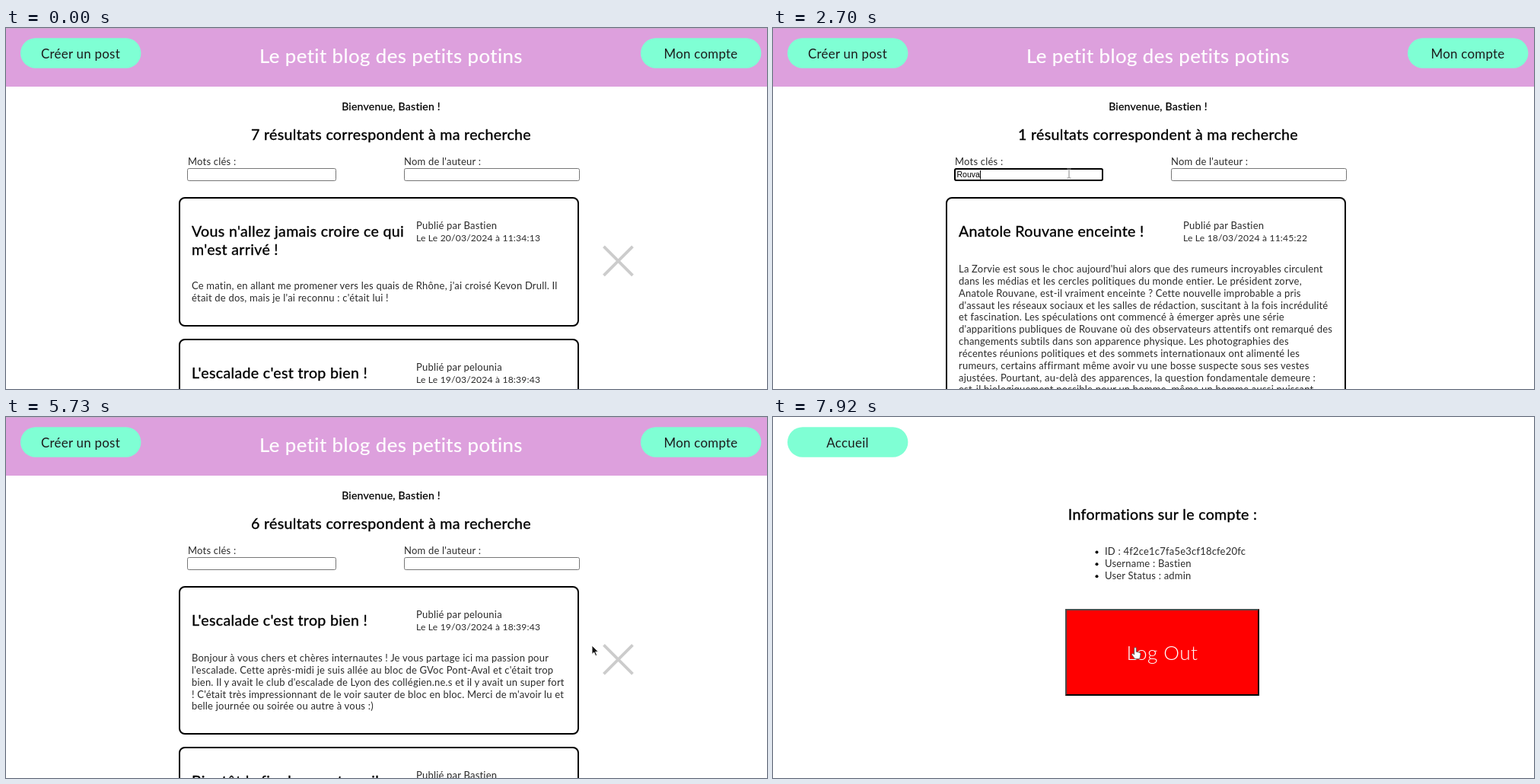
These frames come from a looping animation (1000x474 px, 8 s). An HTML page:

```html
<!DOCTYPE html>
<html lang="fr">
<head>
<meta charset="utf-8">
<title>Le petit blog des petits potins</title>
<style>
  html, body { margin: 0; width: 100%; height: 100%; overflow: hidden; background: #fff; }
  svg { display: block; width: 1000px; height: 474px; }
  text { font: 13px Lato, sans-serif; letter-spacing: .016em; fill: #2b2b2b; }
  .bold { fill: #000; stroke: #000; stroke-width: .018em; stroke-linejoin: round; }
  .h2 { font-size: 19.6px; }
  .h3 { font-size: 14.1px; }
  .mid { text-anchor: middle; }
  .site { font-size: 25.8px; fill: #fff; stroke: #fff; stroke-width: .008em; }
  .btn { font-size: 16.9px; fill: #1c1c1c; }
  .date { font-size: 12.1px; }
  .typed { font: 10.56px "Liberation Sans", sans-serif; letter-spacing: 0; fill: #000; }
  .logout { font-size: 26.2px; font-weight: 300; fill: #fff; }
  .card { fill: #fff; stroke: #000; stroke-width: 2; }
  .field { fill: #fff; stroke: #767676; }
  .cross { fill: none; stroke: #ccc; stroke-width: 3.8; }
  .hot .cross { stroke: #b3b3b3; }
  .arrow { fill: #111; stroke: #fff; stroke-width: .9; }
  .beam { fill: none; stroke: #888; }
  .hand { fill: #fff; stroke: #555; stroke-width: .9; }
</style>
</head>
<body>
<svg id="stage" viewBox="0 0 1000 474"></svg>
<script>
const LOOP = 8000, LINE = 15.84, GAP = 16.3;
const stage = document.getElementById('stage');

function add(parent, tag, attrs = {}, content) {
  const node = document.createElementNS('http://www.w3.org/2000/svg', tag);
  for (const key in attrs) node.setAttribute(key, attrs[key]);
  if (content !== undefined) node.textContent = content;
  return parent.appendChild(node);
}
const group = parent => add(parent, 'g');
const rect = (parent, x, y, width, height, attrs) => add(parent, 'rect', { x, y, width, height, ...attrs });
const text = (parent, x, y, content, cls = '') => add(parent, 'text', { x, y, class: cls }, content);
const show = (node, on) => { node.style.display = on ? '' : 'none'; };

function pill(parent, x, label) {
  rect(parent, x, 13.2, 158.4, 39.6, { rx: 19.8, fill: '#7fffd4' });
  text(parent, x + 79, 39.8, label, 'btn mid');
}

const rumour = {
  title: ['Anatole Rouvane enceinte !'], author: 'Bastien', date: '18/03/2024 à 11:45:22', lines: 30,
  body: [
    "La Zorvie est sous le choc aujourd'hui alors que des rumeurs incroyables circulent",
    'dans les médias et les cercles politiques du monde entier. Le président zorve,',
    'Anatole Rouvane, est-il vraiment enceinte ? Cette nouvelle improbable a pris',
    "d'assaut les réseaux sociaux et les salles de rédaction, suscitant à la fois incrédulité",
    'et fascination. Les spéculations ont commencé à émerger après une série',
    "d'apparitions publiques de Rouvane où des observateurs attentifs ont remarqué des",
    'changements subtils dans son apparence physique. Les photographies des',
    'récentes réunions politiques et des sommets internationaux ont alimenté les',
    'rumeurs, certains affirmant même avoir vu une bosse suspecte sous ses vestes',
    'ajustées. Pourtant, au-delà des apparences, la question fondamentale demeure :',
    'est-il biologiquement possible pour un homme, même un homme aussi puissant'
  ]
};
const star = {
  title: ["Vous n'allez jamais croire ce qui", "m'est arrivé !"], author: 'Bastien', date: '20/03/2024 à 11:34:13',
  body: [
    "Ce matin, en allant me promener vers les quais de Rhône, j'ai croisé Kevon Drull. Il",
    "était de dos, mais je l'ai reconnu : c'était lui !"
  ]
};
const climbing = {
  title: ["L'escalade c'est trop bien !"], author: 'pelounia', date: '19/03/2024 à 18:39:43',
  body: [
    'Bonjour à vous chers et chères internautes ! Je vous partage ici ma passion pour',
    "l'escalade. Cette après-midi je suis allée au bloc de GVoc Pont-Aval et c'était trop",
    "bien. Il y avait le club d'escalade de Lyon des collégien.ne.s et il y avait un super fort",
    "! C'était très impressionnant de le voir sauter de bloc en bloc. Merci de m'avoir lu et",
    'belle journée ou soirée ou autre à vous :)'
  ]
};
const work = { title: ['Bientôt la fin de mon travail'], author: 'Bastien', date: '19/03/2024 à 10:12:08', body: [''] };
const best = { title: ['Le meilleur avant de tout'], author: 'zigou', date: '18/03/2024 à 16:20:31', body: [''] };

function card(parent, post, top) {
  const g = group(parent);
  const bodyTop = 99 + 22 * (post.title.length - 1);
  const height = Math.round(bodyTop + LINE * ((post.lines || post.body.length) - 1) + 33);
  rect(g, 228, top + 1, 524, height - 2, { rx: 7, class: 'card' });
  post.title.forEach((line, i) => text(g, 244, top + 51.5 + 24 * i, line, 'bold h2'));
  text(g, 539, top + 42, 'Publié par ' + post.author);
  text(g, 539, top + 58, 'Le Le ' + post.date, 'date');
  post.body.forEach((line, i) => text(g, 244, top + bodyTop + LINE * i, line));
  const y = top + height / 2 - 1.2;
  add(parent, 'path', { class: 'cross', d: `M785.5 ${y - 19}l38 38m0 -38l-38 38` });
  return { g, height, middle: top + height / 2 };
}

function results(count, posts) {
  const g = group(home);
  text(g, 506, 147, count + ' résultats correspondent à ma recherche', 'bold h2 mid');
  let top = 222;
  const cards = posts.map(post => {
    const made = card(g, post, top);
    top = Math.round(top + made.height + GAP);
    return made;
  });
  return { g, first: cards[0] };
}

// Blog page
const home = group(stage);
rect(home, 0, 0, 1000, 77, { fill: '#dda0dd' });
rect(home, 0, 0, 1000, 1, { fill: '#cbabcb' });
pill(home, 19, 'Créer un post');
pill(home, 834, 'Mon compte');
text(home, 506, 46.3, 'Le petit blog des petits potins', 'bold site mid');
text(home, 506, 107.8, 'Bienvenue, Bastien !', 'bold h3 mid');
text(home, 239, 180.3, 'Mots clés :');
text(home, 523, 180.3, "Nom de l'auteur :");
rect(home, 238.5, 184.5, 195, 16, { rx: 2, class: 'field' });
rect(home, 523.5, 184.5, 230, 16, { rx: 2, class: 'field' });
const focusRing = rect(home, 239, 185, 194, 15, { rx: 2, fill: '#fff', stroke: '#000', 'stroke-width': 2 });
const typed = text(home, 241.5, 196.3, '', 'typed');
const caret = rect(home, 242, 187, 1, 11.5, { fill: '#000' });
const lists = {
  all: results(7, [star, climbing]),
  some: results(3, [climbing, best]),
  one: results(1, [rumour]),
  rest: results(6, [climbing, work])
};

// Account page
const account = group(stage);
pill(account, 19, 'Accueil');
text(account, 512, 135, 'Informations sur le compte :', 'bold h2 mid');
['ID : 4f2ce1c7fa5e3cf18cfe20fc', 'Username : Bastien', 'User Status : admin'].forEach((line, i) => {
  add(account, 'circle', { cx: 425.5, cy: 177.5 + LINE * i, r: 2 });
  text(account, 436, 181.3 + LINE * i, line);
});
rect(account, 384, 252, 255, 114, { fill: '#f00' });
add(account, 'path', { d: 'M384 366V252H639l-2 2H386V364z', fill: '#4c4c4c' });
add(account, 'path', { d: 'M384 366H639V252l-2 2V364H386z' });
text(account, 511.5, 319, 'Log Out', 'logout mid');

// Pointer shapes, hot spot at 0,0
const pointer = group(stage);
const shapes = {
  arrow: 'M0 0V11.5L2.7 9 4.7 13.6 6.6 12.8 4.7 8.3H8.4z',
  beam: 'M-2.5 -6H-.5L0 -5.5 .5 -6H2.5M0 -5.5V5.5M-2.5 6H-.5L0 5.5 .5 6H2.5',
  hand: 'M-1.3 8V.8a1.3 1.3 0 0 1 2.6 0V5.2l4.6 1q1.4 .4 1.2 2l-.7 4.3-1 2.2H-.3l-4-5.3q-.8-1.3 .6-1.7 1.2-.2 2.4 1.3z'
};
for (const name in shapes) shapes[name] = add(pointer, 'path', { d: shapes[name], class: name });

// [time, x, y, shape]
const path = [
  [0, 600, 474, ''], [100, 580, 455, 'arrow'], [870, 392, 214, 'arrow'], [970, 389, 202, 'arrow'],
  [1070, 389, 191, 'beam'], [3290, 389, 191, ''], [4580, 389, 191, 'beam'], [4680, 480, 220, 'arrow'],
  [4880, 740, 300, 'arrow'], [4980, 799, 323, 'hand'], [5490, 799, 323, 'hand'], [5690, 770, 300, 'arrow'],
  [5890, 735, 235, 'arrow'], [6100, 770, 170, 'arrow'], [6290, 804, 109, 'arrow'], [6770, 856, 41, 'hand'],
  [7400, 856, 41, 'hand'], [7490, 800, 80, 'arrow'], [7830, 490, 285, 'arrow'], [7920, 476, 303, 'hand']
];

// [time, letters shown]
const WORD = 'Rouvane';
const typing = [
  [1260, 0], [1840, 1], [2030, 2], [2220, 3], [2500, 4], [2700, 5], [2800, 6], [3000, 7],
  [3290, 6], [3390, 5], [3580, 4], [3780, 3], [4200, 2], [4290, 1], [4380, 0]
];

const lastIndex = (rows, t) => {
  let i = rows.length - 1;
  while (i > 0 && rows[i][0] > t) i--;
  return i;
};

function movePointer(t) {
  const i = lastIndex(path, t), a = path[i], b = path[i + 1] || a;
  // the pointer refreshes about every 95 ms
  const held = Math.floor((t - a[0]) / 95) * 95;
  const k = b === a ? 0 : Math.min(1, held / (b[0] - a[0]));
  const x = a[1] + (b[1] - a[1]) * k, y = a[2] + (b[2] - a[2]) * k;
  pointer.setAttribute('transform', `translate(${x} ${y})`);
  for (const name in shapes) show(shapes[name], name === a[3]);
}

function ramp(t, points) {
  for (let i = 1; i < points.length; i++) {
    const [t0, v0] = points[i - 1], [t1, v1] = points[i];
    if (t >= t0 && t < t1) return v0 + (v1 - v0) * (t - t0) / (t1 - t0);
  }
  return points[0][1];
}

function draw(t) {
  show(home, t < 7400);
  show(account, t >= 7400);

  const [since, length] = typing[lastIndex(typing, t)];
  const focused = t >= 1260 && t < 5290;
  typed.textContent = focused ? WORD.slice(0, length) : '';
  show(focusRing, focused);
  show(caret, focused && (t - since) % 1000 < 500);
  caret.setAttribute('x', length ? 241.5 + typed.getComputedTextLength() : 242);

  const current = t >= 5490 ? 'rest' : !focused || length < 2 ? 'all' : length < 4 ? 'some' : 'one';
  for (const name in lists) show(lists[name].g, name === current);
  home.setAttribute('class', t >= 4980 && t < 5690 ? 'hot' : '');

  const { g, middle } = lists.rest.first;
  const scale = ramp(t, [[5800, 1], [6100, 1.008], [6290, 1.004], [6380, 1]]);
  g.setAttribute('transform', `translate(490 ${middle}) scale(${scale}) translate(-490 ${-middle})`);

  movePointer(t);
}

const start = performance.now();
function tick() {
  draw((performance.now() - start) % LOOP);
  requestAnimationFrame(tick);
}
tick();
</script>
</body>
</html>
```
